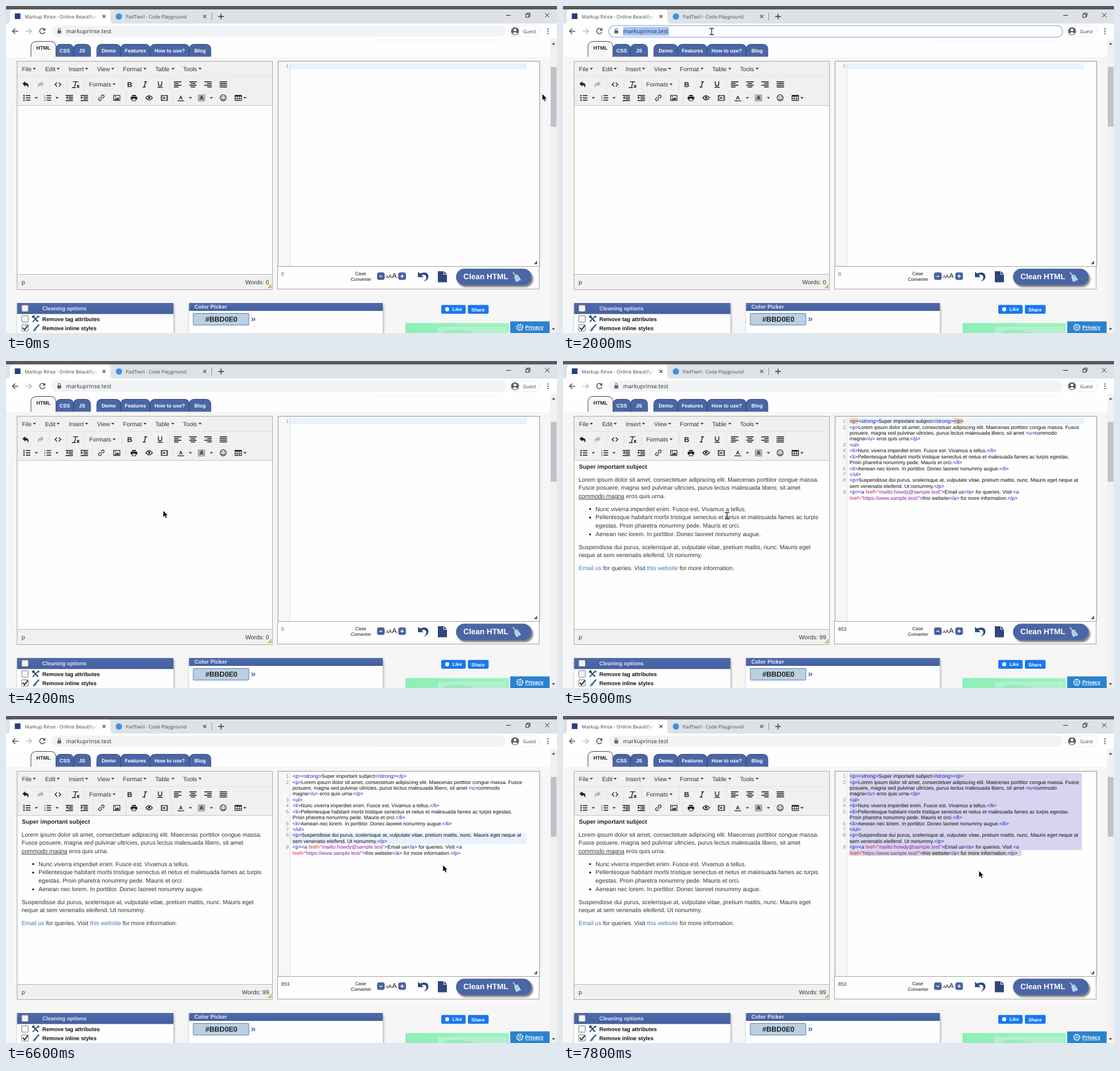
Animation, 971 px wide and 577 px high, one loop 8000 ms. Source, as an HTML page:

```html
<!DOCTYPE html>
<html lang="en">
<head>
<meta charset="utf-8">
<title>Markup editor demo</title>
<style>
  html, body { margin: 0; width: 100%; height: 100%; overflow: hidden; background: #f7f7f7; }
  svg { display: block; width: 100%; height: 100%; }
  text { white-space: pre; text-rendering: geometricPrecision; font-family: "Liberation Sans", Arial, sans-serif; }
  .ui { font-family: "Open Sans", "Noto Sans", sans-serif; }
</style>
</head>
<body>
<svg id="stage" viewBox="0 0 971 577" preserveAspectRatio="none"></svg>
<script>
const LOOP = 8000, STEP = 200;
const BLUE = '#4a66a5', NAVY = '#2f4779', INK = '#333';

// ---- drawing helpers: each returns SVG markup ----
const esc = s => s.replace(/&/g, '&amp;').replace(/</g, '&lt;').replace(/>/g, '&gt;');
const rawText = (x, y, size, body, fill = INK, attrs = '') =>
  `<text x="${x}" y="${y}" font-size="${size}" fill="${fill}" ${attrs}>${body}</text>`;
const text = (x, y, size, s, fill, attrs) => rawText(x, y, size, esc(s), fill, attrs);
const bold = (x, y, size, s, fill, attrs = '') => text(x, y, size, s, fill, 'font-weight="700" ' + attrs);
const ui = (x, y, size, s, fill) => text(x, y, size, s, fill, 'class="ui"');
const rect = (x, y, w, h, fill, attrs = '') =>
  `<rect x="${x}" y="${y}" width="${w}" height="${h}" fill="${fill}" ${attrs}/>`;
const shape = (d, fill, attrs = '') => `<path d="${d}" fill="${fill}" ${attrs}/>`;
const line = (d, stroke = INK, w = 1.3, attrs = '') => shape(d, 'none', `stroke="${stroke}" stroke-width="${w}" ${attrs}`);
const dot = (x, y, r, fill, attrs = '') => `<circle cx="${x}" cy="${y}" r="${r}" fill="${fill}" ${attrs}/>`;
const group = (id, body) => `<g id="${id}">${body}</g>`;
const caret = (x, y) => shape(`M${x - 2.8} ${y - 1.3}h5.6l-2.8 3z`, INK);
const tabShape = (x, y, w, r) =>
  `M${x} 89.5V${y + r}Q${x} ${y} ${x + r} ${y}H${x + w - r}Q${x + w} ${y} ${x + w} ${y + r}V89.5`;

function browser() {
  return rect(0, 0, 971, 31, '#dee1e6') + rect(0, 0, 971, 6, '#5b595c') +
    shape('M0 31Q7 31 7 25V12Q7 6 13 6H178Q184 6 184 12V25Q184 31 191 31Z', '#fff') +
    rect(0, 31, 971, 27, '#fff') +
    rect(15.5, 13, 10, 10, '#23407f') +
    ui(33, 21.5, 8.5, 'Markup Rinse - Online Beautifye', '#3c4043') +
    rect(146, 9, 18, 18, 'url(#fade)') +
    line('M170 15.7l5.4 5.4m0-5.4l-5.4 5.4', '#333', 1.2) +
    dot(199, 18.5, 5.5, '#3f8fe0') +
    ui(211, 21.5, 8.4, 'PadTwirl - Code Playground', '#45494d') +
    line('M347.5 15.7l5.4 5.4m0-5.4l-5.4 5.4', '#444', 1.2) +
    line('M362.5 12V25', '#8a8d92', 1) +
    line('M374 18.5h10m-5-5v10', '#333', 1.4) +
    line('M881.5 16.5h8M950 12.5l7.5 7.5m0-7.5l-7.5 7.5', '#222', 1) +
    line('M916 14.5h5.5v5.5h-5.5zM918 14.5v-2h5.5v5.5h-2', '#222', 1) +
    line('M21.5 44.5h-10m4.8-4.8l-4.8 4.8l4.8 4.8', '#4c5054', 1.5) +
    line('M35 44.5h10m-4.8-4.8l4.8 4.8l-4.8 4.8', '#b9bcc0', 1.5) +
    line('M67.8 41.4A4.7 4.7 0 1 0 68.6 45.6', '#4c5054', 1.5) + shape('M69.3 38.6v5h-5z', '#4c5054') +
    group('bar', rect(80, 34.5, 801, 20, '#f1f3f4', 'rx="10"')) +
    group('barFocus', rect(80.5, 34.5, 800, 20.5, '#fff', 'rx="10.2" stroke="#9dbbe8" stroke-width="1.6"') +
      rect(106, 37, 80.5, 15.5, '#a3c4f5')) +
    rect(90.6, 43, 6.6, 5.4, '#5f6368', 'rx=".7"') + line('M92 43v-1.6a1.9 1.9 0 0 1 3.8 0V43', '#5f6368', 1.1) +
    ui(106, 48.3, 10, 'markuprinse.test', '#2b2e31') +
    rect(886.5, 35, 54.5, 19, '#fff', 'rx="9.5" stroke="#e6e8eb"') +
    dot(897, 44.5, 7, '#5f6368') + dot(897, 42.3, 2.3, '#fff') + shape('M892.6 48.4q4.4-4.4 8.8 0q-4.4 4-8.8 0z', '#fff') +
    ui(911, 47.8, 8.4, 'Guest', '#3c4043') +
    [40.7, 44.7, 48.7].map(y => dot(955, y, 1.1, '#444')).join('');
}

function pageTabs() {
  const tab = (x, w, label, fill = BLUE, ink = '#fff', edge = '#34497c') =>
    shape(tabShape(x, 67.5, w, 9), fill, `stroke="${edge}"`) +
    bold(x + w / 2, 81.6, 9, label, ink, 'text-anchor="middle"');
  return rect(0, 58, 959, 32, '#fefefe') + rect(650, 58, 223, 8, '#fbfbfb') +
    tab(88, 31, 'CSS') + tab(119, 30, 'JS') + tab(160, 42, 'Demo') + tab(202, 52, 'Features') +
    tab(254, 69, 'How to use?') + tab(323, 38, 'Blog') +
    group('blogHover', tab(323, 38, 'Blog', '#a3adc4', '#76809a', '#7783a0')) +
    shape(tabShape(44, 62.5, 44, 10), '#f7f7f7', 'stroke="#444"') +
    bold(66, 76.6, 9, 'HTML', '#222', 'text-anchor="middle"');
}

// four bars; each entry is [offset, width]
const bars = (x, y, rows) => rows.map(([dx, w], i) => rect(x + dx, y + i * 3, w, 1.6, '#222')).join('');

function toolbar() {
  const menus = [['File', 28, 50], ['Edit', 69, 92], ['Insert', 110.5, 142], ['View', 160.5, 188],
    ['Format', 206, 245], ['Table', 263, 294], ['Tools', 312, 342]];
  const seps = [[76, 126], [107, 126], [138, 126], [204, 126], [288, 126], [22, 151], [152, 151], [211, 151], [293, 151]];
  const even = [[0, 13], [0, 13], [0, 13], [0, 13]];
  return menus.map(([s, x, c]) => text(x, 114.5, 10.55, s) + caret(c, 110.5)).join('') +
    line('M20 124.5H469', '#e2e2e4', 1) +
    seps.map(([x, y]) => line(`M${x + .5} ${y}v23`, '#dedee0', 1)).join('') +
    // row one
    shape('M29 137l5-4v2.6q6 .2 5.6 6q-.3 1.8-1.2 2.4q.2-4.2-4.4-4.3v2.5z', '#222') +
    shape('M66.5 137l-5-4v2.6q-6 .2-5.6 6q.3 1.8 1.2 2.4q-.2-4.2 4.4-4.3v2.5z', '#b4b4b6') +
    line('M90 135l-3.6 3.5l3.6 3.5m3-7l3.6 3.5l-3.6 3.5', '#222', 1.4) +
    line('M118 133.6h9.5m-4.2 0l-2.6 9.4M116 144h7m2-4.5l4 4.8m0-4.8l-4 4.8', '#222', 1.4) +
    text(146.5, 142, 10.55, 'Formats') + caret(190.5, 138) +
    group('underHover', rect(259.5, 127, 25.5, 23, '#dcdcde', 'stroke="#c8c8ca"')) +
    bold(213.5, 143, 12.5, 'B', '#222') +
    line('M243.5 133.7h5.2m-8 9.4h5.2m.2-9.4l-2.6 9.4', '#222', 1.5) +
    line('M268.5 133v4.8a3 3.2 0 0 0 6 0V133M267 143.6h9.2', '#222', 1.5) +
    bars(296, 133, [[0, 13], [0, 8], [0, 13], [0, 8]]) + bars(323, 133, [[0, 13], [2.5, 8], [0, 13], [2.5, 8]]) +
    bars(349.5, 133, [[0, 13], [5, 8], [0, 13], [5, 8]]) + bars(376.5, 133, even) +
    // row two
    [158, 162, 166].map((y, i) => rect(30.5, y - 1, 2.4, 2.4, '#222') + rect(35, y - .6, 8, 1.6, '#222') +
      text(67, y + 1.8, 4.6, '' + (i + 1), '#222') + rect(71.5, y - .6, 8, 1.6, '#222')).join('') +
    caret(53.5, 162) + caret(90, 162) +
    bars(105, 157, [[0, 13], [5, 8], [5, 8], [0, 13]]) + shape('M109 159.3v5l-3.6-2.5z', '#222') +
    bars(131.5, 157, [[0, 13], [5, 8], [5, 8], [0, 13]]) + shape('M132 159.3v5l3.6-2.5z', '#222') +
    line('M167 164.3h-2.6a2.3 2.3 0 0 1 0-4.6h2.6m2 0h2.6a2.3 2.3 0 0 1 0 4.6h-2.6M166 162h4', '#333', 1.3, 'transform="rotate(-45 168 162)"') +
    rect(189.7, 157.7, 11, 9, 'none', 'stroke="#222" stroke-width="1.2"') + shape('M191 165.5l2.6-3.3l1.6 1.5l2.2-3.2l2.2 5z', '#222') + dot(192.8, 160.2, 1, '#222') +
    rect(222, 157, 7, 2.2, '#222') + rect(219.7, 160, 11.6, 5, '#222', 'rx="1"') + rect(222.3, 163, 6.4, 4.2, '#f0f0f0', 'stroke="#222"') +
    line('M246.5 162q5.8-7.5 11.6 0q-5.8 7.5-11.6 0z', '#222', 1.3) + dot(252.3, 161.8, 2, '#222') +
    rect(273.6, 158, 11, 8.6, 'none', 'stroke="#222" stroke-width="1.2"') +
    line('M275.3 158v8.6m7.6-8.6v8.6', '#222', 1.4, 'stroke-dasharray="1.5 1.2"') + shape('M277.4 160l4 2.3l-4 2.3z', '#222') +
    bold(304.7, 165, 9.4, 'A', '#222') + rect(302, 166.7, 12, 1.3, '#222') + caret(325, 162) +
    rect(338, 156, 13, 12.5, '#a9adb5') + bold(341.2, 165.4, 9.4, 'A', '#222') + caret(362, 162) +
    dot(382.7, 162, 5.3, 'none', 'stroke="#222" stroke-width="1.2"') + dot(380.8, 160.5, .9, '#222') + dot(384.6, 160.5, .9, '#222') +
    line('M379.6 163.3q3.1 3.4 6.2 0', '#222', 1.1) +
    rect(403.6, 157.7, 11.4, 9, 'none', 'stroke="#222" stroke-width="1.2"') + rect(403.6, 157.4, 11.4, 2.4, '#222') +
    line('M407.4 158v9m3.8-9v9M403.6 163.3h11.4', '#222', .9) + caret(421, 162);
}

function richText() {
  const S = 10.45, row = (x, y, s) => text(x, y, S, s);
  return bold(28, 190.2, S, 'Super important subject', '#222') +
    row(27.5, 212.6, 'Lorem ipsum dolor sit amet, consectetuer adipiscing elit. Maecenas porttitor congue massa.') +
    row(27.5, 227.4, 'Fusce posuere, magna sed pulvinar ultricies, purus lectus malesuada libero, sit amet') +
    rawText(27.5, 242.2, S, '<tspan text-decoration="underline">commodo magna</tspan> eros quis urna.') +
    [261.3, 276.2, 306].map(y => dot(47.8, y, 1.7, '#222')).join('') +
    row(57.3, 264.6, 'Nunc viverra imperdiet enim. Fusce est. Vivamus a tellus.') +
    row(57.3, 279.4, 'Pellentesque habitant morbi tristique senectus et netus et malesuada fames ac turpis') +
    row(57.3, 294.3, 'egestas. Proin pharetra nonummy pede. Mauris et orci.') +
    row(57.3, 309.2, 'Aenean nec lorem. In porttitor. Donec laoreet nonummy augue.') +
    row(27.5, 331.6, 'Suspendisse dui purus, scelerisque at, vulputate vitae, pretium mattis, nunc. Mauris eget') +
    row(27.5, 346.4, 'neque at sem venenatis eleifend. Ut nonummy.') +
    rawText(27.5, 368.6, S, '<tspan fill="#4478b4">Email us</tspan> for queries. Visit <tspan fill="#4478b4">this website</tspan> for more information.');
}

const codeY = i => 109.2 + i * 10.42;
// a leading "#" marks a wrapped row, which has no line number
const CODE = [
  '<p><strong>Super important subject</strong></p>',
  '<p>Lorem ipsum dolor sit amet, consectetuer adipiscing elit. Maecenas porttitor congue massa. Fusce',
  '#posuere, magna sed pulvinar ultricies, purus lectus malesuada libero, sit amet <u>commodo',
  '#magna</u> eros quis urna.</p>',
  '<ul>',
  '<li>Nunc viverra imperdiet enim. Fusce est. Vivamus a tellus.</li>',
  '<li>Pellentesque habitant morbi tristique senectus et netus et malesuada fames ac turpis egestas.',
  '#Proin pharetra nonummy pede. Mauris et orci.</li>',
  '<li>Aenean nec lorem. In porttitor. Donec laoreet nonummy augue.</li>',
  '</ul>',
  '<p>Suspendisse dui purus, scelerisque at, vulputate vitae, pretium mattis, nunc. Mauris eget neque at',
  '#sem venenatis eleifend. Ut nonummy.</p>',
  '<p><a href="mailto:howdy@sample.test">Email us</a> for queries. Visit <a',
  '#href="https://www.sample.test/">this website</a> for more information.</p>'
];

function tint(tok) {
  const color = /^[<>]/.test(tok) ? '#1414b4' : tok === 'href=' ? '#d02020' : tok[0] === '"' ? '#8a1ca8' : '#0c0c0c';
  return `<tspan fill="${color}">${esc(tok)}</tspan>`;
}

function codeText() {
  let n = 0;
  return CODE.map((src, i) => {
    const wrapped = src[0] === '#';
    const tokens = (wrapped ? src.slice(1) : src).split(/(<\/?\w+|>|href=|"[^"]*")/).filter(Boolean);
    return (wrapped ? '' : text(498.3, codeY(i), 8.95, '' + ++n, '#8f8f8f', 'text-anchor="end"')) +
      rawText(505, codeY(i), 8.95, tokens.map(tint).join(''));
  }).join('');
}

function editors() {
  return rect(19.5, 97.5, 450, 403, '#fefefe', 'stroke="#a8a8aa"') +
    rect(20, 98, 449, 77, '#f0f0f1') + line('M20 175.5H469', '#c4c4c6', 1) +
    rect(20, 473, 449, 27, '#f0f0f1') + line('M20 473.5H469', '#b4b4b6', 1) +
    toolbar() +
    text(27.5, 490.7, 10.5, 'p') + text(463.5, 490.7, 10.5, 'Words: 0', INK, 'id="words" text-anchor="end"') +
    shape('M468 490v8h-8z', '#e0b779') +
    rect(479.5, 97.5, 461, 362, '#fefefe', 'stroke="#929294"') +
    rect(480, 98, 20.5, 361, '#f7f7f7') + line('M500.5 98V459', '#ddd', 1) +
    group('active1', rect(501, 101, 416.5, 10.5, '#e8f2fd')) +
    group('active8', rect(501, 205.3, 416.5, 20.5, '#e8f2fd')) +
    group('tagMatch', rect(505, 101, 15.4, 10.5, '#f6d9b2') + rect(687.5, 101, 17.7, 10.5, '#f6d9b2')) +
    group('selected', rect(505, 101, 409.5, 135.5, '#d7d4f0') + rect(505, 236.5, 303, 10.3, '#d9d7dd')) +
    group('firstNumber', text(498.3, codeY(0), 8.95, '1', '#b58d62', 'text-anchor="end"')) +
    group('pasted', richText() + codeText()) +
    shape('M936 449.5v6h-6z', '#555') +
    group('tooltip', shape('M267.5 154.3l4-4l4 4z', '#1d1d1d') + rect(248, 153.7, 47, 15.5, '#1d1d1d', 'rx="1"') +
      bold(271.5, 164.2, 7.8, 'Underline', '#fff', 'text-anchor="middle"'));
}

function actions() {
  const sizer = (x, d) => rect(x, 470.5, 12.6, 12.4, BLUE, 'rx="3" stroke="#34497c" stroke-width=".7"') + line(d, '#fff', 1.5);
  return rect(478.5, 459.5, 461, 40, '#fefefe', 'stroke="#a0a0a2"') +
    text(485, 475.5, 8.9, '0', '#8a4a22', 'id="count"') +
    text(625, 474.9, 8.2, 'Case', '#111', 'text-anchor="middle"') +
    text(625.7, 484.7, 8.2, 'Converter', '#111', 'text-anchor="middle"') +
    sizer(654.3, 'M658.3 477h4.6') + sizer(691.8, 'M695.2 476.7h5.8m-2.9-2.9v5.8') +
    text(669.5, 480.3, 7, 'A', '#111') + text(674, 480.3, 9, 'A', '#111') + text(680.2, 480.3, 12.4, 'A', '#111') +
    shape('M726 469v9.5h9.8l-3.5-3.4q7.6-2.5 8.4 3.5q.2 4-4.3 7.6q8.6-2.6 8-9.6q-1.6-9.7-14.7-4.7z', NAVY) +
    shape('M761 468h10v6h6v13.5h-16zM772 468l5 5h-5z', NAVY) +
    rect(795.5, 467, 133.5, 29, '#555', 'rx="14.5" opacity=".75" filter="url(#soft)"') +
    rect(793, 463.5, 133, 29, BLUE, 'rx="14.5"') + bold(806, 481.8, 13.7, 'Clean HTML', '#fff') +
    line('M893.5 470l4.6 6', '#e3c9a0', 2) +
    shape('M896 476.5l5-3l2.3 3l4.3 7l-8.5 3.5l-3-7.5z', '#b9dcf2') + line('M898 479.5l6-3.3m-3 3.5l2.5 5', '#6f9cc4', .9);
}

function panels() {
  const box = y => rect(27.7, y - 5.5, 11.6, 11.4, '#f4f4f4', 'rx="1.5" stroke="#777"');
  const panel = (x, w, headH) => rect(x, 527, w + 2, 52, '#888', 'opacity=".55" filter="url(#soft)"') +
    rect(x, 524, w, 53, '#fefefe') + rect(x, 524, w, headH, 'url(#head)');
  return panel(19.5, 275.5, 19.5) +
    box(533.3) + bold(64, 536.6, 9.62, 'Cleaning options', '#dde4f2') +
    box(552) + bold(64, 555.5, 9.67, 'Remove tag attributes', '#111') +
    line('M47 547l9.5 10', '#26415f', 2.4) + line('M57.5 546.5l-10.5 11', '#35618c', 2) + line('M46.3 549.6l3.4-3.4', '#26415f', 2.8) +
    line('M55 548.6q2 .8 4-1', '#35618c', 2) +
    box(568) + line('M29.7 567.6l3 3.7l6-8', '#1d3464', 2) + bold(64, 571.7, 9.67, 'Remove inline styles', '#111') +
    line('M58.3 562.2l-6.6 7', '#2c3f58', 2) + shape('M51.8 567.7l2 2q-1.8 5-7.6 4.2q2.6-1 2.6-3.4q1-2.2 3-2.8z', '#3b78b8') +
    panel(322.5, 341.5, 14) +
    bold(332, 534.4, 9.75, 'Color Picker', '#e8edf6') +
    rect(330, 542.5, 98, 20.5, '#bbd0e0', 'rx="1" stroke="#5c7ab4"') + bold(379.5, 556.5, 12.6, '#BBD0E0', '#222', 'text-anchor="middle"') +
    bold(431.5, 557.3, 15.5, '»', BLUE) +
    rect(767, 527.5, 43, 15.5, '#1877f2', 'rx="2.2"') + dot(777.5, 535.2, 3.6, '#fff') + bold(786.5, 538.4, 8.5, 'Like', '#fff') +
    rect(814, 527.5, 36.5, 15.5, '#1877f2', 'rx="2.2"') + bold(820, 538.7, 8.5, 'Share', '#fff') +
    rect(704, 559.5, 182, 18, 'url(#ad)') + rect(762.5, 567.5, 117, 12, '#b2efca', 'stroke="#cdf7de"') +
    shape('M768 577q20-8 40-4q14 2 22 4z', '#9be8ba') +
    rect(888.5, 556.5, 69.5, 21, '#2b82d0') +
    dot(905.5, 567, 4.6, 'none', 'stroke="#fff" stroke-width="1.1"') + dot(905.5, 567, 1.7, 'none', 'stroke="#fff"') +
    dot(905.5, 567, 5.6, 'none', 'stroke="#fff" stroke-width="1.4" stroke-dasharray="2 2.4"') +
    bold(915, 570.2, 9, 'Privacy', '#fff', 'text-decoration="underline"') +
    rect(959, 58, 12, 519, '#f1f1f1') + rect(960, 107.5, 10, 105.5, '#c1c1c4') +
    shape('M962 68l3-3.4l3 3.4z', '#505050') + shape('M961.8 568.6h6l-3 3.4z', '#505050');
}

const gradient = (id, dir, ...stops) => `<linearGradient id="${id}" ${dir}>` +
  stops.map(([o, c, a = 1]) => `<stop offset="${o}" stop-color="${c}" stop-opacity="${a}"/>`).join('') + '</linearGradient>';
const DOWN = 'x1="0" y1="0" x2="0" y2="1"';

document.getElementById('stage').innerHTML = '<defs>' +
  gradient('fade', '', [0, '#fff', 0], [.85, '#fff']) +
  gradient('head', DOWN, [0, '#4f6bab'], [1, '#4660a0']) +
  gradient('ad', '', [0, '#8cf0b6'], [1, '#9df3c2']) +
  '<filter id="soft" x="-10%" y="-30%" width="120%" height="160%"><feGaussianBlur stdDeviation="1.6"/></filter></defs>' +
  rect(0, 58, 959, 519, '#f6f6f6') + browser() + pageTabs() + editors() + actions() + panels() +
  group('arrow', shape('M0 0V11.6L2.7 9.2L4.5 13.3L6.6 12.4L4.8 8.4H8.3Z', '#0a0a0a', 'stroke="#fff" stroke-width=".5"')) +
  group('beam', line('M-4-5.7h3q1 0 1 1q0-1 1-1h3M0-5v10M-4 5.7h3q1 0 1-1q0 1 1 1h3', '#111', 1.2));

// ---- motion ----
// pointer keys: time, x, y
const PATH = [
  [0, 945, 155], [1200, 420, 100], [1400, 340, 64], [1800, 262, 45], [3000, 262, 45],
  [3200, 276, 187], [3600, 277, 264], [4600, 277, 264], [4800, 289, 273], [5200, 289, 273],
  [6000, 786, 216], [6200, 786, 216], [6600, 770, 263], [6800, 770, 263], [7400, 733, 273], [8000, 733, 273]
];
const BEAM = [[1400, 3200], [4600, 5400], [5800, 6400]];

const $ = id => document.getElementById(id);
const show = (id, on) => $(id).setAttribute('display', on ? 'inline' : 'none');
const within = (t, a, b) => t >= a && t < b;

function pointer(t) {
  const i = PATH.findIndex((k, n) => n > 0 && t < k[0]);
  const [t0, x0, y0] = PATH[i - 1], [t1, x1, y1] = PATH[i];
  const u = (t - t0) / (t1 - t0), e = u * u * (3 - 2 * u);
  return [x0 + (x1 - x0) * e, y0 + (y1 - y0) * e];
}

function draw(ms) {
  const t = Math.floor((ms % LOOP) / STEP) * STEP;
  const pasted = t >= 4600, focused = within(t, 2000, 3800), hover = within(t, 3200, 3600);
  show('bar', !focused);
  show('barFocus', focused);
  show('blogHover', within(t, 1400, 1600));
  show('underHover', hover);
  show('tooltip', hover);
  show('pasted', pasted);
  show('firstNumber', !pasted);
  show('active1', t < 6200);
  show('tagMatch', within(t, 4600, 6200));
  show('active8', within(t, 6200, 7200));
  show('selected', t >= 7200);
  $('words').textContent = 'Words: ' + (pasted ? 99 : 0);
  $('count').textContent = pasted ? 853 : 0;
  $('count').setAttribute('fill', pasted ? '#333' : '#8a4a22');

  const [x, y] = pointer(t), isBeam = BEAM.some(([a, b]) => within(t, a, b));
  show('arrow', !isBeam);
  show('beam', isBeam);
  $(isBeam ? 'beam' : 'arrow').setAttribute('transform', `translate(${x} ${y})`);
}

const start = performance.now();
function tick() {
  draw(performance.now() - start);
  requestAnimationFrame(tick);
}
draw(0);
requestAnimationFrame(tick);
</script>
</body>
</html>
```
